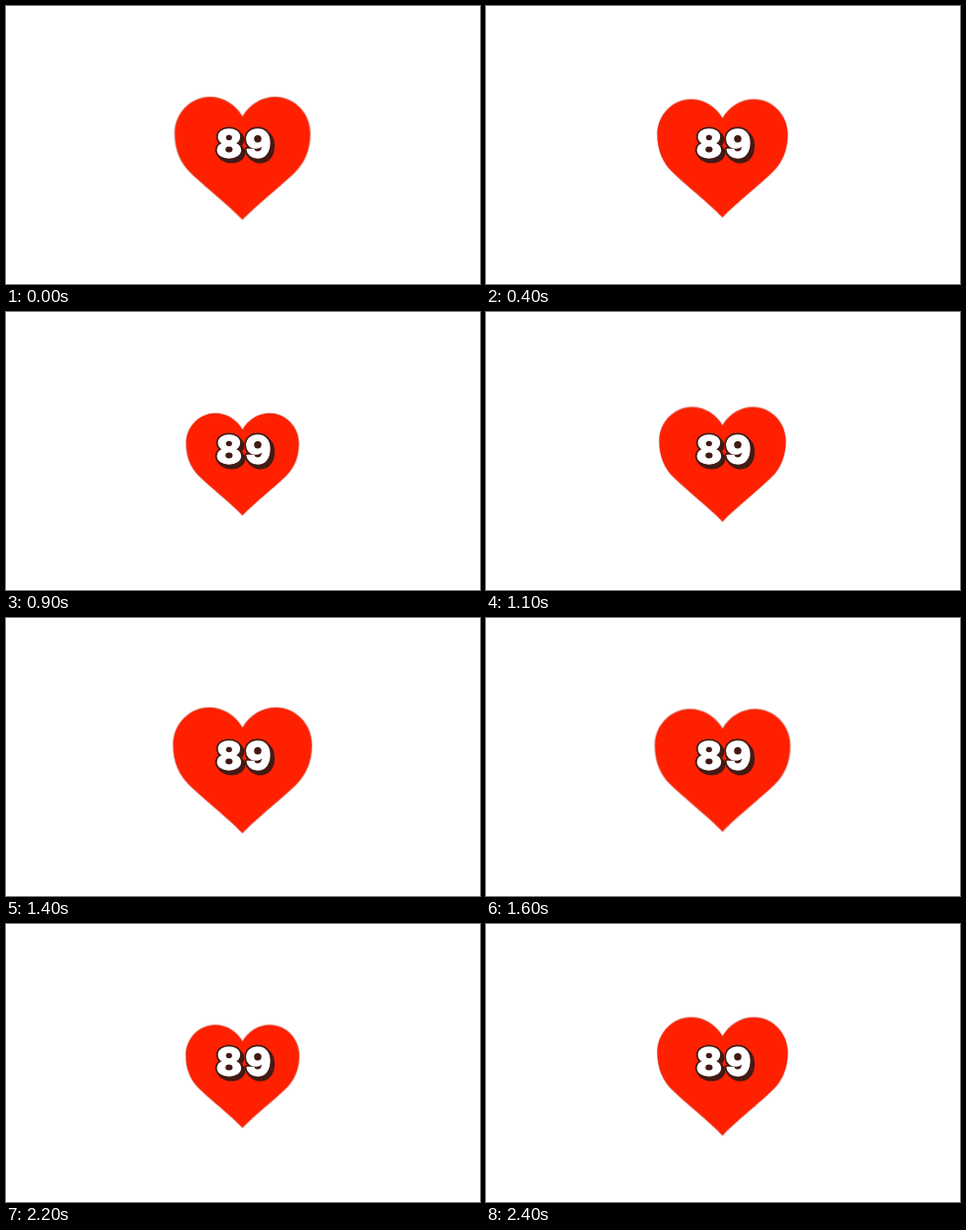
An HTML page for the animation above (2500 ms loop, 480 by 282 pixels).

```html
<!DOCTYPE html>
<html lang="en">
<head>
<meta charset="utf-8">
<title>Beating heart</title>
<style>
  html, body { margin: 0; width: 100%; height: 100%; overflow: hidden; background: #fff; }
  svg { display: block; width: 480px; height: 282px; }

  #heart {
    fill: #ff2000; stroke: #5a2020; stroke-opacity: .45; stroke-width: .5;
    animation: beat 1250ms -1000ms infinite paused;
  }
  @keyframes beat {
    0% { transform: scale(1); animation-timing-function: ease-in-out; }
    30%, 54% { transform: scale(.81); animation-timing-function: ease; }
    100% { transform: scale(1); }
  }

  text { font: 850 39.5px Inter, Roboto, sans-serif; text-anchor: middle; stroke-linejoin: round; }
  .edge { fill: #431a15; stroke: #431a15; stroke-width: 5; }
  .face { fill: #fff; stroke: #fff; stroke-width: 1.5; }
</style>
</head>
<body>
<svg viewBox="0 0 480 282">
  <defs>
    <text id="count" x="225.8 255.4" y="154.2">89</text>
  </defs>
  <g transform="translate(239.5 154.5)">
    <path id="heart" d="M0-43.5C-7-56-20-64-34-64C-54-64-70.5-47-70.5-26
      C-70.5-8-64 5-55 14C-41 28-14 49 0 64C14 49 41 28 55 14
      C64 5 70.5-8 70.5-26C70.5-47 54-64 34-64C20-64 7-56 0-43.5Z"/>
  </g>
  <g class="edge">
    <use href="#count" x="2.7" y="3.2"/>
    <use href="#count" x="1.4" y="1.6"/>
    <use href="#count"/>
  </g>
  <use class="face" href="#count"/>
</svg>
<script>
  const LOOP = 2500, STEP = 100;
  const [beat] = document.getElementById('heart').getAnimations();

  // The beat advances in hard steps of 100 ms.
  function draw(now) {
    beat.currentTime = Math.floor((now % LOOP) / STEP) * STEP;
    requestAnimationFrame(draw);
  }
  draw(0);
</script>
</body>
</html>
```
